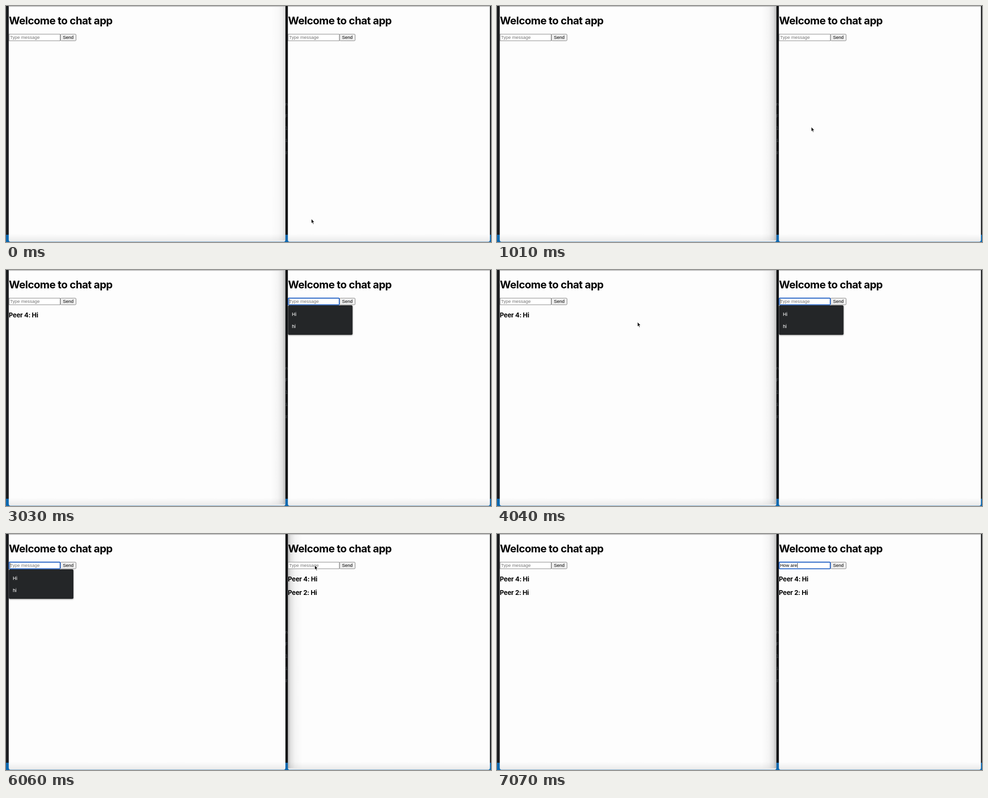
An HTML page for the animation above (8 s loop, 1000 by 488 pixels).

```html
<!DOCTYPE html>
<html lang="en">
<head>
<meta charset="utf-8">
<title>Chat app</title>
<style>
  html, body { margin: 0; width: 100%; height: 100%; overflow: hidden; background: #191b1d; }
  svg { display: block; width: 1000px; height: 488px; }
  text { white-space: pre; }
  .title { font: 700 21.8px Inter, sans-serif; letter-spacing: -.51px; }
  .message { font: 700 13.2px Inter, sans-serif; letter-spacing: -.2px; }
  .control { font: 9.42px "Liberation Sans", Arial, sans-serif; }
  .hint { fill: #757575; }
  .option { font: 500 9.3px Inter, sans-serif; fill: #f4f4f4; }
  .behind { font: 9px "Noto Sans Mono", monospace; fill: #4a4d50; }
  .menu { filter: drop-shadow(0 1px 1.5px rgba(0, 0, 0, .45)); }
</style>
</head>
<body>
<svg viewBox="0 0 1000 488">
  <defs>
    <linearGradient id="side">
      <stop offset="0" stop-opacity="0"/>
      <stop offset=".5" stop-opacity=".035"/>
      <stop offset=".8" stop-opacity=".11"/>
      <stop offset="1" stop-opacity=".26"/>
    </linearGradient>
    <linearGradient id="foot" x2="0" y2="1">
      <stop offset="0" stop-opacity="0"/>
      <stop offset="1" stop-opacity=".075"/>
    </linearGradient>
    <clipPath id="gap"><rect x="576" width="5" height="488"/></clipPath>
  </defs>
  <rect width="1000" height="488" fill="#191b1d"/>
  <rect x="576" width="6" height="488" fill="#111315"/>
  <rect y="473" width="1000" height="15" fill="#0b67ae"/>
  <g id="behind" clip-path="url(#gap)"></g>
  <g id="windows"></g>
  <g id="live"></g>
</svg>
<script>
const LOOP = 8000, STEP = 1010, RIGHT = 575.5;
const first = "Peer 4: Hi", second = "Peer 2: Hi";

// One entry per step: front window, side shadow strength, pane states, pointer.
const steps = [
  { front: "right", shade: .5, arrow: [629.5, 440] },
  { front: "right", shade: 1, arrow: [648, 250] },
  { front: "right", shade: 1, arrow: [664, 63.5] },
  { front: "right", shade: 1, left: { log: [first] },
    right: { log: [first], focus: true, menu: ["Hi", "hi"] } },
  { front: "right", shade: 1, left: { log: [first] },
    right: { log: [first], focus: true, menu: ["Hi", "hi"] }, arrow: [289.7, 107.5] },
  { front: "left", shade: 1, left: { log: [first], focus: true, menu: ["Hi", "hi", "Ok"] },
    right: { log: [first] }, beam: [82.3, 65.3] },
  { front: "left", shade: 1, left: { log: [first, second], focus: true, menu: ["Hi", "hi"] },
    right: { log: [first, second] }, arrow: [636.5, 64.5] },
  { front: "right", shade: 1, left: { log: [first, second] },
    right: { log: [first, second], focus: true, value: "How are", caret: 619 - RIGHT } }
];

const $ = id => document.getElementById(id);
const text = (cls, x, y, s) => `<text class="${cls}" x="${x}" y="${y}">${s}</text>`;
const rect = (x, y, w, h, extra) =>
  `<rect x="${x}" y="${y}" width="${w}" height="${h}" ${extra}/>`;

function windowFrame(x, w) {
  return `<path d="M${x} 0h${w}v483.5q0 4-4 4h${8 - w}q-4 0-4-4z" fill="#fdfdfd"/>` +
    `<path d="M${x} 471h${w}v12.5q0 4-4 4h${8 - w}q-4 0-4-4z" fill="url(#foot)"/>` +
    rect(x, 0, w, 1.4, 'fill="#b4b4b4"');
}

function menu(items) {
  const rows = items.map((s, i) => text("option", 14, 94.7 + 25 * i, s)).join("");
  return rect(6, 73, 133, 11 + 25 * items.length, 'rx="2.5" fill="#242628" class="menu"') + rows;
}

function pane(x, { log = [], focus, value, caret = 8.3, menu: items } = {}) {
  const border = focus
    ? 'rx="1.5" fill="#fff" stroke="#1f5fc4" stroke-width="1.9"'
    : 'fill="#fff" stroke="#777" stroke-width=".9"';
  return `<g transform="translate(${x})">` +
    text("title", 6, 37.6, "Welcome to chat app") +
    rect(112.4, 58.2, 32, 13.7, 'rx="1.8" fill="#efefef" stroke="#777" stroke-width=".9"') +
    text("control", 117.2, 68.3, "Send") +
    rect(6.3, 58.2, 105.4, 13.7, border) +
    text(value ? "control" : "control hint", 8.2, 68.3, value || "Type message") +
    (focus ? rect(caret, 60, .8, 10, 'fill="#111"') : "") +
    log.map((s, i) => text("message", 5.8, 98 + 28 * i, s)).join("") +
    (items ? menu(items) : "") + "</g>";
}

function shadow(front, shade) {
  return front === "right"
    ? rect(546, 1.4, 30, 483, `fill="url(#side)" opacity="${shade}"`)
    : `<g transform="translate(1157) scale(-1 1)">` +
      rect(546, 1.4, 30, 483, `fill="url(#side)" opacity="${shade}"`) + "</g>";
}

function pointer({ arrow, beam }) {
  if (arrow) return `<path transform="translate(${arrow})" fill="#000" stroke="#fff"
    stroke-width=".9" d="M0 0V9.6L2.1 7.7 3.6 11.2 5.2 10.5 3.7 7.1H6.6Z"/>`;
  if (beam) return `<path transform="translate(${beam})" fill="none" stroke="#111"
    d="M-2-5Q0-5 0-3.7Q0-5 2-5M0-4V4M-2 5Q0 5 0 3.7Q0 5 2 5M-1 1.3H1"/>`;
  return "";
}

$("behind").innerHTML =
  [..."nFlir"].map((s, i) => text("behind", 575.5, 205.5 + 25 * i, s)).join("");
$("windows").innerHTML = windowFrame(5.7, 570.4) + windowFrame(581.2, 416.6);

let shown = -1;
function draw() {
  const i = Math.floor(performance.now() % LOOP / STEP);
  if (i !== shown) {
    const s = steps[shown = i];
    $("live").innerHTML = shadow(s.front, s.shade) +
      pane(0, s.left) + pane(RIGHT, s.right) + pointer(s);
  }
  requestAnimationFrame(draw);
}
draw();
</script>
</body>
</html>
```
